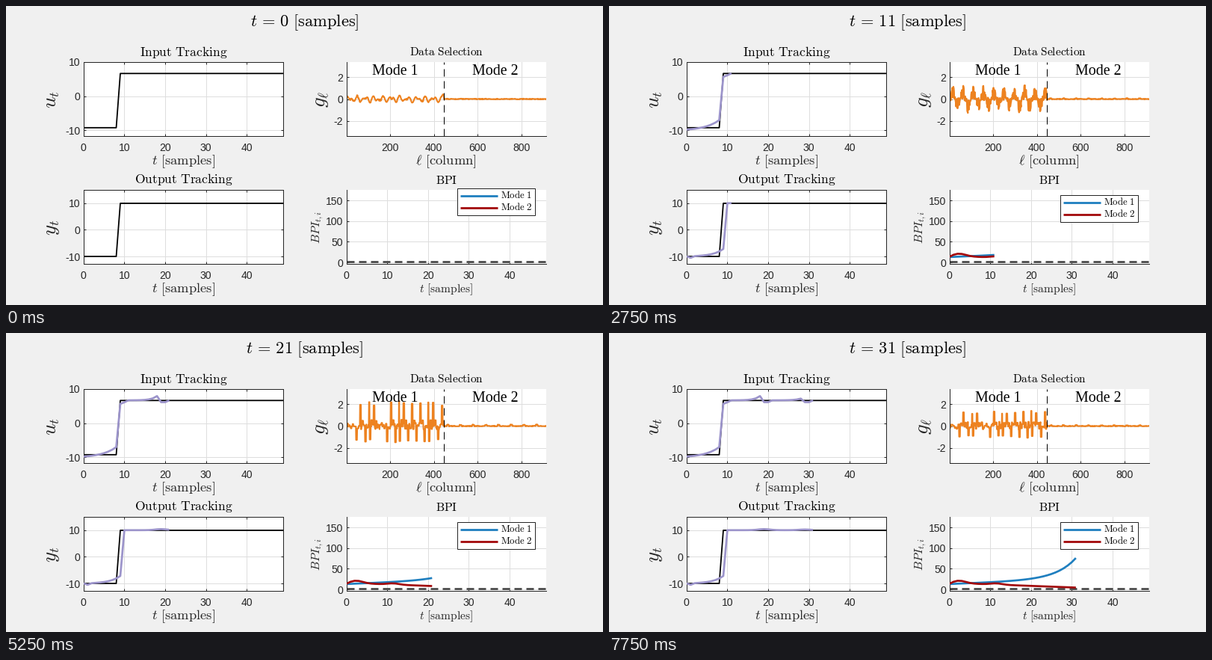
A matplotlib script that plays this animation: 799 px wide and 400 px high, repeating every 8 s.

```python
import numpy as np
import matplotlib.pyplot as plt
from matplotlib.animation import FuncAnimation
from matplotlib.patches import Rectangle

W, H, DPI = 799, 400, 100
PX = 72 / DPI  # points per pixel
STEPS, INTERVAL = 32, 250
LEFT, RIGHT, WIDE, TALL = .13 * W, .5703 * W, .3347 * W, 99
TOP, LOW = 75, 246
INK = "#262626"
ORANGE, PURPLE = "#ed8220", "#9c94cb"
BLUE, RED = "#1f7fbf", "#a2090b"
DASH = (10 * PX, 6 * PX)

plt.rcParams.update({
    "mathtext.fontset": "cm",
    "font.family": "Liberation Sans",
    "lines.scale_dashes": False,
    "axes.unicode_minus": False,
    "path.simplify": False,
})

fig = plt.figure(figsize=(W / DPI, H / DPI), dpi=DPI, facecolor="#f0f0f0")

# Overlay in pixel coordinates for all text and the legend.
over = fig.add_axes([0, 0, 1, 1], zorder=5)
over.set(xlim=(0, W), ylim=(H, 0))
over.axis("off")


def label(x, y, text, size, color="black", ha="center", rot=0, font=None):
    return over.text(x, y, text, fontsize=size * PX, color=color, ha=ha,
                     va="baseline", rotation=rot, rotation_mode="anchor",
                     family=font or "Liberation Sans", zorder=6)


def rm(text):
    return r"\mathrm{" + text.replace(" ", r"\ ") + "}"


def panel(x0, y0, xlim, ylim, xticks, yticks, boxed, title, size, xname, ysym):
    bottom, mid = y0 + TALL, x0 + WIDE / 2
    ax = fig.add_axes([x0 / W, 1 - bottom / H, WIDE / W, TALL / H])
    ax.set(xlim=xlim, ylim=ylim, xticks=xticks, yticks=yticks)
    ax.set_axisbelow(True)
    ax.grid(True, color="#dedede", lw=PX)
    ax.tick_params(direction="in", length=3 * PX, width=PX, color=INK,
                   top=boxed, right=boxed, labelleft=False, labelbottom=False)
    for side, spine in ax.spines.items():
        spine.set(color=INK, linewidth=PX, zorder=2.6)
        spine.set_visible(boxed or side in ("left", "bottom"))
    for v in xticks:
        px = x0 + WIDE * (v - xlim[0]) / (xlim[1] - xlim[0])
        label(px, bottom + 20, str(v), 14, INK)
    for v in yticks:
        py = bottom - TALL * (v - ylim[0]) / (ylim[1] - ylim[0])
        label(x0 - 4.5, py + 5.5, str(v), 14, INK, "right")
    label(mid + .5, y0 - 8.5, f"${rm(title)}$", size)
    sym, unit, unit_size = xname
    label(mid - .3, bottom + 38.5, rf"${sym}\ {rm('[' + unit + ']')}$", unit_size, INK)
    sym, sym_x, sym_size = ysym
    label(sym_x, y0 + 50, f"${sym}$", sym_size, INK, rot=90)
    return ax


tens = range(0, 50, 10)
span = (0, 49)
samples = ("t", "samples", 18.5)
ax_u = panel(LEFT, TOP, span, (-11.7, 10), tens, (-10, 0, 10), True,
             "Input Tracking", 17.5, samples, ("u_t", 67, 27))
ax_y = panel(LEFT, LOW, span, (-12.8, 15.05), tens, (-10, 0, 10), True,
             "Output Tracking", 17.5, samples, ("y_t", 67, 27))
ax_g = panel(RIGHT, TOP, (1, 914), (-3.4, 3.4), range(200, 801, 200), (-2, 0, 2), False,
             "Data Selection", 15.4, (r"\ell", "column", 18.5), (r"g_\ell", 428, 27))
ax_b = panel(RIGHT, LOW, span, (-3.5, 175.5), tens, range(0, 151, 50), False,
             "BPI", 15.8, ("t", "samples", 15.6), ("BPI_{t,i}", 420, 16))

head = label(399.5, 27, "", 22.4)
for i, x in enumerate((521, 655)):
    label(x, 92, f"Mode {i + 1}", 20, font="Liberation Serif")

# Legend
box = Rectangle((604, 0), 104, 36, fc="white", ec=INK, lw=PX, zorder=5)
over.add_patch(box)
keys = []
for i, color in enumerate((BLUE, RED)):
    line, = over.plot([608, 658], [0, 0], color=color, lw=2.8 * PX, zorder=6,
                      solid_capstyle="butt")
    keys.append((line, label(662, 0, f"${rm('Mode ' + str(i + 1))}$", 12.8, ha="left")))

# References
time = np.arange(50)
for ax, low, high in ((ax_u, -9.25, 6.65), (ax_y, -10, 10)):
    ax.plot(time, np.where(time < 9, low, high), color="black", lw=1.8 * PX)
ax_g.axvline(447, color="black", lw=PX, dashes=DASH, zorder=3)
ax_b.axhline(1.5, color="#404040", lw=2.6 * PX, dashes=DASH, zorder=2)


def bump(t, center, width):
    return np.exp(-((t - center) / width) ** 2)


def control(t):
    before = -9.8 + .33 * (np.exp(.28 * t) - 1)
    cycle, phase = np.divmod(t - 9, 10)
    drift = 1.25 * .4 ** cycle * np.exp((phase - 9) / 1.3)
    after = 6.7 + drift - .55 * (phase < 2) - .5 * bump(t, 9, .6)
    return np.where(t < 9, before, after)


def output(t):
    before = -9.95 + .078 * (np.exp(.4 * t) - 1) - .6 * bump(t, 1, .6)
    after = 10.05 + .4 * bump(t, 19, 2) + .25 * bump(t, 29, 2)
    return np.where(t < 10, before, after)


def rising(t):
    return 13 + .4 * t + 50.6 * np.exp(.21 * (t - 31))


def falling(t):
    return 16 - .37 * t + 6 * bump(t, 2.5, 2.2) - 4 * bump(t, 0, .8) + 3 * bump(t, 11.5, 2)


def trace(ax, color):
    return ax.plot([], [], color=color, lw=2.7 * PX, solid_capstyle="butt",
                   solid_joinstyle="round", zorder=3)[0]


traces = ((trace(ax_u, PURPLE), control), (trace(ax_y, PURPLE), output),
          (trace(ax_b, BLUE), rising), (trace(ax_b, RED), falling))

# Selection weights: slow waves, then dense bars, then separate spikes
col = np.arange(1, 915)
wave = np.cos(2 * np.pi * (col - 62) / 47)
peaks = np.array([65, 106, 127, 205, 243, 263, 301, 339, 376, 397, 438])
g_line, = ax_g.plot([], [], color=ORANGE, lw=2.1 * PX, solid_joinstyle="round", zorder=2.5)


def swing(k):
    return np.interp(k, [0, 7, 11, 18, 21, 25, 31], [.25, .35, 1.25, 1.6, 2.35, .95, 1.4])


def steps(rng, size):
    return np.repeat(rng.uniform(-1, 1, 914 // size + 1), size)[:914]


def slow(k, rng):
    early = .7 * np.sin(2 * np.pi * col / 39) + .5 * np.sin(2 * np.pi * col / 24 + 1)
    shape = early + k / 7 * (.8 * np.tanh(2 * wave) - early)
    tail = (.4 + .04 * k) * np.clip((col - 436) / 9, 0, 1)
    return swing(k) * (shape + .3 * steps(rng, 4)) + tail


def bars(k, rng):
    teeth = np.where(col % 9 < 5, 1, .05)
    return swing(k) * (.95 * wave * teeth * (.8 + .2 * steps(rng, 9)) + .15 * steps(rng, 3))


def spikes(k, rng):
    a = swing(k)
    dense = np.clip(2 - a, 0, 1)
    g = .3 * steps(rng, 4)
    for p in peaks:
        height = a * rng.uniform(.8, 1)
        for off, part in ((-18, -.65 - .2 * dense), (0, 1), (10, .25), (22, .5 * dense)):
            g[np.abs(col - p - off) < 3] = height * part
    return g


def weights(k):
    rng = np.random.default_rng(40 + k)
    shape = slow if k < 8 else bars if k < 15 else spikes
    blips = .05 * swing(k) * (np.cos(2 * np.pi * col / 58) > .9)
    rest = .03 * steps(rng, 3) + blips
    return np.where(col < 447, shape(k, rng), rest)


def draw(k):
    head.set_text(rf"$t\,=\,{k}\ {rm('[samples]')}$")
    t = np.arange(k + 1.0)
    for line, rule in traces:
        line.set_data(t, rule(t))
    g_line.set_data(col, weights(k))
    top = 244 if k == 0 else 253
    box.set_y(top)
    for i, (line, text) in enumerate(keys):
        mid = top + 9.5 + 16.3 * i
        line.set_ydata([mid, mid])
        text.set_y(mid + 3.5)
    return []


anim = FuncAnimation(fig, draw, frames=STEPS, interval=INTERVAL,
                     init_func=lambda: draw(0), repeat=True, repeat_delay=0)
plt.show()
```
